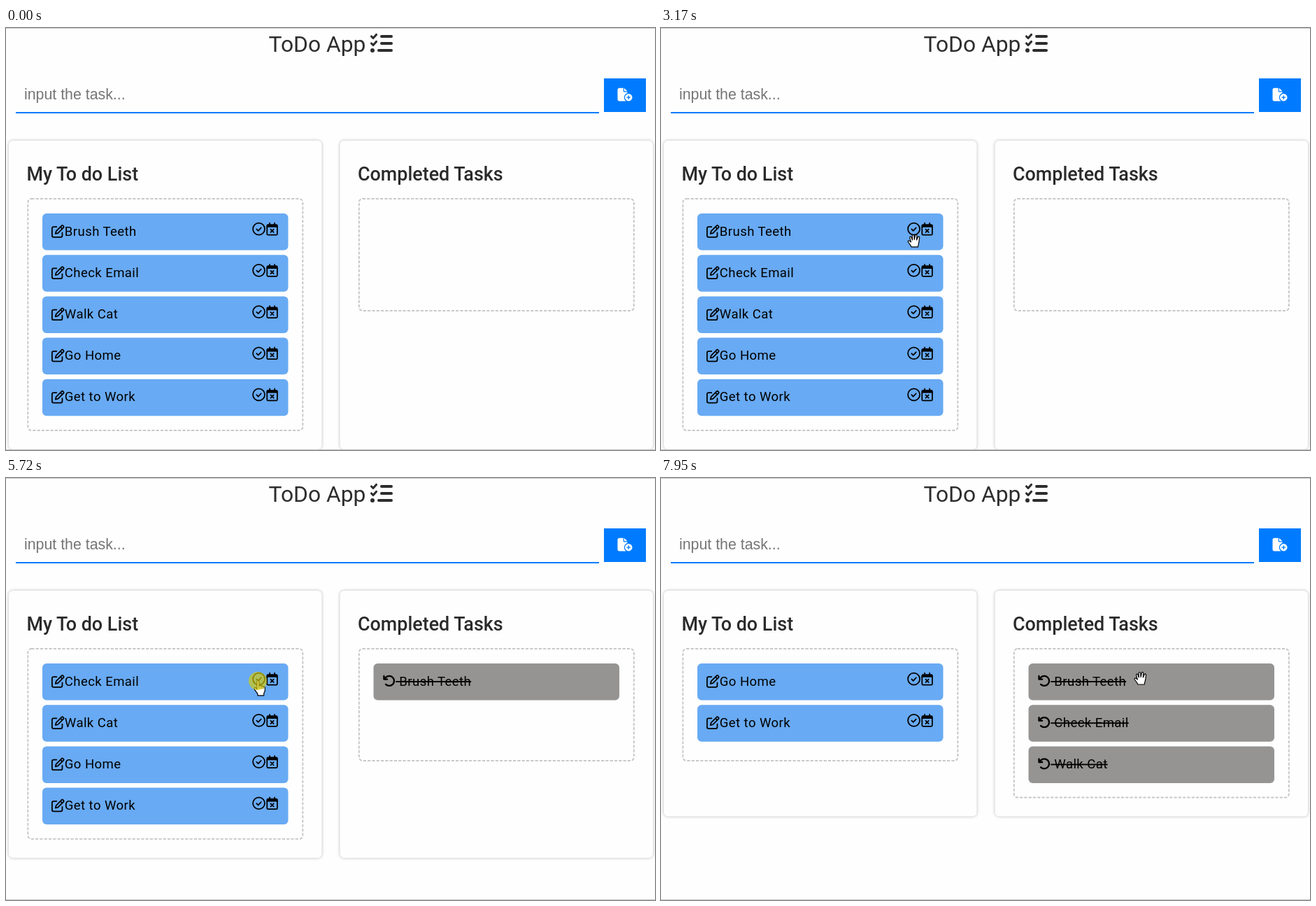
An HTML page for the animation above (8000 ms loop, 928x603 px).

```html
<!DOCTYPE html>
<html lang="en">
<head>
<meta charset="utf-8">
<title>ToDo App</title>
<style>
  html, body { margin: 0; width: 100%; height: 100%; overflow: hidden; background: #fefefe; }
  svg { display: block; width: 100%; height: 100%; }
  text { font-family: Roboto, sans-serif; white-space: pre; }
  .title { font-size: 31.8px; fill: #2d2d2d; }
  .head { font-size: 26.9px; font-weight: 500; fill: #2a2a2a; }
  .hint { font: 21.33px "Liberation Sans", Arial, sans-serif; fill: #757575; }
  .task { font-size: 18.6px; letter-spacing: .4px; }
  .struck { text-decoration: line-through; }
  .tip { font: 14.5px "Open Sans", sans-serif; fill: #575757; }
  .card { fill: #fefefe; filter: drop-shadow(0 0 2px rgba(0, 0, 0, .28)); }
  .zone { fill: none; stroke: #c9c9c9; stroke-width: 2; stroke-dasharray: 4.2 2.1; }
  .line { fill: none; stroke-linecap: round; stroke-linejoin: round; }
  .hand { fill: #fff; stroke: #000; stroke-width: 1.2; stroke-linejoin: round; }
</style>
</head>
<body>
<svg id="stage" viewBox="0 0 928 603">
  <defs>
    <g id="checklist" class="line" stroke="#2d2d2d" stroke-width="64">
      <path stroke-width="50" d="M24 96l40 40 72-80M24 256l40 40 72-80"/>
      <path d="M256 96H480M256 256H480M192 416H480"/>
      <circle cx="48" cy="416" r="48" fill="#2d2d2d" stroke="none"/>
    </g>
    <g id="addFile" fill="#fff">
      <path d="M0 64C0 29 29 0 64 0H224V128a32 32 0 0 0 32 32H384V199C310 220 256 287 256 368c0 59 29 111 74 143L320 512H64c-35 0-64-29-64-64ZM384 128H256V0Z"/>
      <circle cx="432" cy="368" r="144"/>
      <path class="line" stroke="#007bff" stroke-width="36" d="M432 304V432M368 368H496"/>
    </g>
    <g id="edit" class="line" stroke="#000" stroke-width="48">
      <path d="M200 88H88a64 64 0 0 0-64 64V424a64 64 0 0 0 64 64H360a64 64 0 0 0 64-64V312"/>
      <path d="M158 354l24-96L402 38a34 34 0 0 1 48 0l24 24a34 34 0 0 1 0 48L254 330ZM352 88l72 72"/>
    </g>
    <g id="check" class="line" stroke="#000" stroke-width="48">
      <circle cx="256" cy="256" r="232"/>
      <path d="M168 264l64 64 112-118"/>
    </g>
    <g id="remove" class="line" stroke="#000" stroke-width="48">
      <path d="M128 24V90M320 24V90M24 180V448a40 40 0 0 0 40 40H384a40 40 0 0 0 40-40V180M167 271L281 385M281 271L167 385"/>
      <path fill="#000" stroke="none" d="M0 192V128a64 64 0 0 1 64-64H384a64 64 0 0 1 64 64V192Z"/>
    </g>
    <path id="undo" class="line" stroke="#000" stroke-width="64"
      d="M48 64V192H176M48 192L120 120A192 192 0 1 1 120 392"/>
  </defs>

  <rect width="928" height="603" fill="#fefefe"/>
  <text class="title" x="375.5" y="34">ToDo App</text>
  <use href="#checklist" transform="translate(521 6) scale(.0625)"/>
  <text class="hint" x="26" y="102">input the task...</text>
  <path fill="#007bff" d="M14 120H848v2H14ZM855 72h60v48h-60Z"/>
  <use href="#addFile" transform="translate(874.5 85.7) scale(.0365)"/>

  <rect class="card" x="4" y="161" width="447.5" rx="6"/>
  <rect class="card" x="477.5" y="161" width="447.5" rx="6"/>
  <text class="head" x="29.5" y="218">My To do List</text>
  <text class="head" x="503" y="218">Completed Tasks</text>
  <rect class="zone" x="31.3" y="244" width="393" rx="5"/>
  <rect class="zone" x="504.8" y="244" width="393" rx="5"/>
  <g id="rows"></g>
  <path fill="#c8c8c8" d="M0 0H928V1H0ZM0 602H928v1H0Z"/>

  <g id="tip">
    <rect x="370.5" y="305.5" width="118" height="26" fill="#fff" stroke="#767676"/>
    <text class="tip" x="379" y="323.5">Complete Task</text>
  </g>
  <g id="cursor">
    <path id="arrow" stroke="#fff" stroke-width=".6"
      d="M0 0V19.4L4.4 15.4L7.4 22L10.2 20.8L7.3 14.3H13.2Z"/>
    <g id="grab" class="hand" transform="translate(-9.7 -10)">
      <path d="M5.5 19C5 17 3 14.5 1 12C0 10.3 2 9.3 3.3 10.5L5 12L3.3 6C2.8 4 5 3.4 5.6 5.2L7 9L6.8 3C6.8 1 9.2 1 9.4 3L9.8 8.5L11 2.6C11.4 .8 13.6 1.2 13.4 3.2L13 9L15 4.8C15.8 3.2 17.6 4 17.2 5.8C16.5 9 16.8 11 16 14C15.5 16 15 17 15 19Z"/>
    </g>
    <g id="point" class="hand" transform="translate(-6.1 -.8)">
      <path d="M4.6 2.6C4.6 .4 7.6 .4 7.6 2.6V9C8 7.6 10.4 7.8 10.6 9.4C11.2 8.4 13.2 8.8 13.4 10.2C14 9.4 16 10 16 11.6V15C16 17 14.4 18.5 14.4 20V22.6H5.6V20.4C4.5 18.5 2 15.5 .9 13.4C.2 11.8 2 10.8 3.2 12L4.6 13.6Z"/>
      <path fill="none" stroke-width=".9" d="M7.6 9v4M10.6 9.6V13M13.4 10.4V13"/>
    </g>
  </g>
  <circle id="press" cx="360" cy="290" r="13" fill="#d8cd00" opacity=".65"/>
</svg>

<script>
const LOOP = 8000;
const TOP = 265, PITCH = 59.2, ROW_W = 351.5, ROW_H = 52.5;
const TODO_X = 52, DONE_X = 525.5;
const TASKS = ["Brush Teeth", "Check Email", "Walk Cat", "Go Home", "Get to Work"];
const CLICKS = [[4410, 4460], [5720, 5800], [6790, 6870]];
const OFF = [-99, -99];

// start, end, poses, ease-out power, points of a line or cubic curve
const MOVES = [
  [0, 0, 1, 1, [OFF]],
  [70, 140, 2, 1, [[755, 582], [180, 360]]],
  [210, 210, 1, 1, [OFF]],
  [1120, 1840, 10, 1, [[0, 148.5], [20, 395], [165, 395], [146, 311]]],
  [2140, 2910, 11, 3.38, [[201, 312], [249, 312], [298, 311], [346, 297]]],
  [3010, 3240, 4, 1, [[350, 300], [358, 309], [366, 310], [361, 291.5]]],
  [3390, 3470, 2, 1, [[360.7, 290], [360.4, 289]]],
  [7480, 7950, 7, 1, [[385, 320], [520, 580], [915, 475], [686, 286]]]
];

const $ = id => document.getElementById(id);
const show = (el, on) => el.setAttribute("visibility", on ? "inherit" : "hidden");
const icon = (id, x, y) => `<use href="#${id}" transform="translate(${x} ${y}) scale(.0365)"/>`;
const row = (color, inner) =>
  `<g><rect width="${ROW_W}" height="${ROW_H}" rx="6" fill="${color}"/>${inner}</g>`;

const todoRow = name => row("#68aaf3",
  icon("edit", 13, 16) + `<text class="task" x="31.8" y="31.7">${name}</text>` +
  icon("check", 300.2, 12.8) + icon("remove", 320.4, 12.8));
const doneRow = name => row("#969493",
  icon("undo", 13.2, 15.6) + `<text class="task struck" x="31.8" y="31.7">\u00a0${name}</text>`);

$("rows").innerHTML = TASKS.map(todoRow).join("") + TASKS.map(doneRow).join("");
const rows = [...$("rows").children];
const cards = document.querySelectorAll(".card");
const zones = document.querySelectorAll(".zone");

// Collapse the control points pair by pair (de Casteljau)
function along(points, u) {
  while (points.length > 1)
    points = points.slice(1).map((b, i) => b.map((v, j) => points[i][j] + (v - points[i][j]) * u));
  return points[0];
}

function cursorAt(t) {
  const [start, end, poses, power, points] = MOVES.filter(m => m[0] <= t).pop();
  if (poses < 2) return points[0];
  const last = poses - 1;
  const pose = Math.min(last, Math.floor((t - start) / (end - start) * last + .001));
  return along(points, 1 - (1 - pose / last) ** power);
}

function cursorKind(x, y, done) {
  const inList = (left, count) => {
    const i = Math.floor((y - TOP) / PITCH), dy = y - TOP - i * PITCH;
    return x >= left && x <= left + ROW_W && i >= 0 && i < count && dy <= ROW_H ? dy : -1;
  };
  const dy = inList(TODO_X, TASKS.length - done);
  if (dy >= 12 && dy <= 32 && x >= 352 && x <= 389) return "point";
  return dy >= 0 || inList(DONE_X, done) >= 0 ? "grab" : "arrow";
}

function draw(t) {
  const done = CLICKS.filter(c => t >= c[1]).length;
  const left = TASKS.length - done;

  rows.forEach((el, i) => {
    const isDone = i >= TASKS.length, n = i % TASKS.length;
    const slot = isDone ? n : n - done;
    show(el, isDone ? n < done : n >= done);
    el.setAttribute("transform", `translate(${isDone ? DONE_X : TODO_X} ${TOP + slot * PITCH})`);
  });

  const heights = [left, done].map(n => Math.max(160, n * PITCH + 35));
  zones.forEach((z, i) => z.setAttribute("height", heights[i]));
  cards.forEach(c => c.setAttribute("height", Math.max(...heights) + 110));

  const [x, y] = cursorAt(t), kind = cursorKind(x, y, done);
  $("cursor").setAttribute("transform", `translate(${x} ${y})`);
  for (const id of ["arrow", "grab", "point"]) show($(id), id === kind);
  show($("press"), CLICKS.some(([a, b]) => t >= a && t < b));
  show($("tip"), t >= 3990 && t < 4410);
}

const begin = performance.now();
function tick() {
  draw((performance.now() - begin) % LOOP);
  requestAnimationFrame(tick);
}
tick();
</script>
</body>
</html>
```
